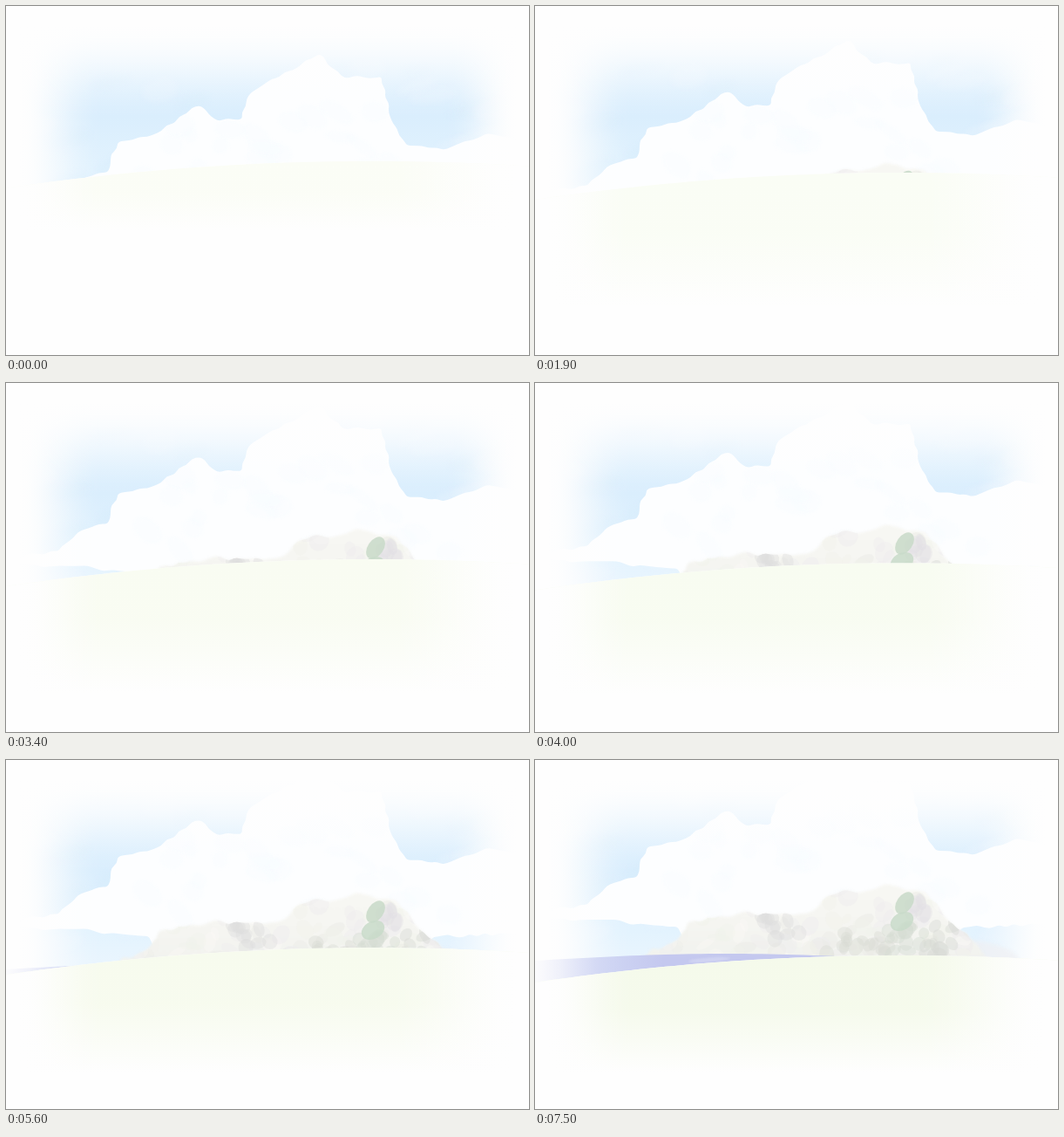
An HTML page with a canvas that plays this animation: 600 px wide and 400 px high, repeating every 8000 ms.

```html
<!DOCTYPE html>
<html lang="en">
<head>
<meta charset="utf-8">
<title>Watercolour hill</title>
<style>
  html, body { margin: 0; width: 100%; height: 100%; overflow: hidden; background: #fefefe; }
  canvas { display: block; width: 600px; height: 400px; }
</style>
</head>
<body>
<canvas id="stage" width="600" height="400"></canvas>
<script>
const ctx = document.getElementById('stage').getContext('2d');
const PAPER = '254,254,254';
const LOOP = 8000;

// Runs of equal holds: [duration in ms, count]
const HOLDS = [[500, 1], [200, 1], [300, 11], [400, 5], [500, 4]];
const LAST = HOLDS.reduce((sum, [, count]) => sum + count, 0) - 1;

// Key corners; roughen() adds the bumps between them.
const CLOUD = [[0, 232], [60, 222], [90, 197], [116, 191], [128, 156], [170, 147],
  [222, 114], [245, 132], [271, 130], [280, 100], [313, 82], [359, 55], [385, 81],
  [431, 81], [441, 128], [460, 160], [502, 165], [552, 146], [600, 158],
  [600, 242], [490, 248], [480, 270], [175, 270], [164, 247], [75, 239], [0, 236]];
const MOUNTAIN = [[120, 226], [165, 205], [182, 184], [230, 177], [312, 176],
  [345, 154], [410, 144], [449, 152], [480, 188], [518, 226]];

// Groups of brush dabs inside the mountain
const CLUSTERS = [
  { x: 280, y: 191, w: 24, h: 14, count: 12, tint: '#dedddd' },
  { x: 372, y: 211, w: 38, h: 12, count: 16, tint: '#d9dcd3' },
  { x: 430, y: 205, w: 26, h: 16, count: 14, tint: '#d5dcd2' },
  { x: 464, y: 208, w: 18, h: 18, count: 12, tint: '#d6dad3' },
  { x: 442, y: 175, w: 12, h: 16, count: 8, tint: '#e2dfe4' }
];

const hillY = x => 224 + 31 * ((x - 420) / 420) ** 2;
const seaY = x => 230 - 8 * Math.sin(Math.PI * x / 440);

function random(seed) {
  return () => (seed = (seed * 16807) % 2147483647) / 2147483647;
}

function roughen(corners, amount, seed) {
  const rnd = random(seed);
  const points = [];
  for (let i = 0; i < corners.length - 1; i++) {
    const [x, y] = corners[i];
    const dx = corners[i + 1][0] - x, dy = corners[i + 1][1] - y;
    const length = Math.hypot(dx, dy);
    const count = Math.ceil(length / 9);
    for (let k = 0; k < count; k++) {
      const t = k / count;
      const push = k ? amount * (rnd() - 0.4) / length : 0;
      points.push([x + dx * t + dy * push, y + dy * t - dx * push]);
    }
  }
  return [...points, corners[corners.length - 1]];
}

function trace(points) {
  ctx.beginPath();
  ctx.moveTo(...points[0]);
  for (let i = 1; i < points.length - 1; i++) {
    const [x, y] = points[i], [nx, ny] = points[i + 1];
    ctx.quadraticCurveTo(x, y, (x + nx) / 2, (y + ny) / 2);
  }
  ctx.lineTo(...points[points.length - 1]);
  ctx.closePath();
}

function traceBelow(curve, floor) {
  ctx.beginPath();
  ctx.moveTo(0, floor);
  for (let x = 0; x <= 600; x += 10) ctx.lineTo(x, curve(x));
  ctx.lineTo(600, floor);
  ctx.closePath();
}

function blob(x, y, rx, ry, angle, colour, alpha) {
  ctx.globalAlpha = alpha;
  ctx.fillStyle = colour;
  ctx.beginPath();
  ctx.ellipse(x, y, rx, ry, angle, 0, Math.PI * 2);
  ctx.fill();
  ctx.globalAlpha = 1;
}

function gradient(x0, y0, x1, y1, stops) {
  const g = ctx.createLinearGradient(x0, y0, x1, y1);
  stops.forEach(([at, colour]) => g.addColorStop(at, colour));
  return g;
}

// Paper-coloured fade, opaque at (x0, y0) and clear at (x1, y1).
function fade(x0, y0, x1, y1) {
  const stops = Array.from({ length: 9 }, (_, i) => {
    const t = i / 8;
    return [t, `rgba(${PAPER},${1 - t * t * (3 - 2 * t)})`];
  });
  ctx.fillStyle = gradient(x0, y0, x1, y1, stops);
  ctx.fillRect(0, 0, 600, 400);
}

function layer(dy, paint) {
  ctx.save();
  ctx.translate(0, dy);
  paint();
  ctx.restore();
}

const cloudEdge = roughen(CLOUD, 5, 17);
const mountainEdge = roughen(MOUNTAIN, 7, 53);

function drawSky(step) {
  ctx.fillStyle = gradient(0, 60, 0, 230, [[0, '#e0f1fe'], [0.4, '#daeefd'], [0.8, '#e3f3fe'], [1, '#e9f5fe']]);
  ctx.fillRect(0, 0, 600, 260);
  layer(-8 / 3 * step, () => {
    const rnd = random(71);
    ctx.filter = 'blur(3px)';
    for (let i = 0; i < 45; i++) {
      blob(30 + rnd() * 540, 70 + rnd() * 200, 14 + rnd() * 22, 5 + rnd() * 9,
        -0.4 + rnd() * 0.3, rnd() < 0.6 ? '#eaf6ff' : '#d4ebfc', 0.3);
    }
    ctx.filter = 'blur(0.5px)';
    trace(cloudEdge);
    ctx.fillStyle = '#fdfeff';
    ctx.fill();
    ctx.clip();
    ctx.filter = 'blur(2px)';
    for (let i = 0; i < 30; i++) {
      blob(130 + rnd() * 420, 120 + rnd() * 110, 8 + rnd() * 14, 5 + rnd() * 8,
        rnd(), '#f7fcff', 0.4);
    }
  });
  fade(16, 0, 110, 0);
  fade(585, 0, 505, 0);
  fade(0, 22, 0, 128);
}

function drawMountain() {
  const rnd = random(293);
  ctx.filter = 'blur(2px)';
  blob(505, 222, 50, 15, 0.15, '#efeff3', 0.7);
  ctx.filter = 'blur(1.5px)';
  trace(mountainEdge);
  ctx.fillStyle = gradient(0, 145, 0, 226, [[0, '#f7f7f3'], [0.5, '#f5f5f1'], [1, '#f1f2ee']]);
  ctx.fill();
  ctx.clip();
  ctx.filter = 'blur(0.5px)';
  for (let i = 0; i < 110; i++) {
    const x = 140 + rnd() * 360, y = 148 + rnd() * 80;
    const tint = ['#e9e9e4', '#fbfaf7', '#edebee', '#f1f3eb'][i % 4];
    blob(x, y, 5 + rnd() * 8, 4 + rnd() * 7, rnd() * 3, tint, 0.25 + 0.2 * x / 500);
  }
  CLUSTERS.forEach(({ x, y, w, h, count, tint }) => {
    for (let i = 0; i < count; i++) {
      blob(x + (rnd() * 2 - 1) * w, y + (rnd() * 2 - 1) * h,
        6 + rnd() * 5, 5 + rnd() * 5, rnd() * 3, tint, 0.42);
    }
  });
  blob(424, 164, 9, 14, 0.6, '#c8dac8', 0.85);
  blob(421, 185, 14, 10, -0.5, '#c8dbc9', 0.85);
}

function drawSea() {
  const tone = alpha => `rgba(196,200,239,${alpha})`;
  traceBelow(seaY, 275);
  ctx.fillStyle = gradient(0, 0, 420, 0,
    [[0, tone(0.04)], [0.07, tone(0.25)], [0.17, tone(0.65)], [0.35, tone(1)], [0.8, tone(1)], [1, tone(0)]]);
  ctx.fill();
  ctx.clip();
  ctx.filter = 'blur(1px)';
  blob(200, 229, 24, 2.5, -0.08, '#d6d9f4', 0.7);
}

function drawHill(step) {
  const drop = 2.2 * (LAST - step);
  const crest = 224 - drop;
  const bottom = 258 + 100 * (1 - Math.exp(-step / 3));
  const depth = (step / LAST) ** 1.6;
  const mix = (from, to) => Math.round(from + (to - from) * depth);
  const rgb = `${mix(251, 245)},${mix(253, 250)},${mix(246, 235)}`;
  ctx.save();
  traceBelow(x => hillY(x) - drop, 400);
  ctx.clip();
  ctx.fillStyle = `rgb(${PAPER})`;
  ctx.fillRect(0, 0, 600, 400);
  ctx.fillStyle = gradient(0, crest, 0, bottom,
    [[0, `rgb(${rgb})`], [0.45, `rgba(${rgb},0.95)`], [0.7, `rgba(${rgb},0.55)`], [1, `rgba(${rgb},0)`]]);
  ctx.fillRect(0, 0, 600, bottom);
  fade(15, 0, 115, 0);
  fade(585, 0, 435, 0);
  ctx.restore();
}

function draw(step) {
  const farDrop = 2.5 * (LAST - step);
  ctx.fillStyle = `rgb(${PAPER})`;
  ctx.fillRect(0, 0, 600, 400);
  drawSky(step);
  layer(farDrop, drawMountain);
  layer(farDrop, drawSea);
  drawHill(step);
}

function stepAt(time) {
  let step = 0;
  for (const [duration, count] of HOLDS) {
    if (time < duration * count) return step + Math.floor(time / duration);
    time -= duration * count;
    step += count;
  }
  return LAST;
}

let shown = -1;
function tick() {
  const step = stepAt(performance.now() % LOOP);
  if (step !== shown) draw(shown = step);
  requestAnimationFrame(tick);
}
tick();
</script>
</body>
</html>
```
